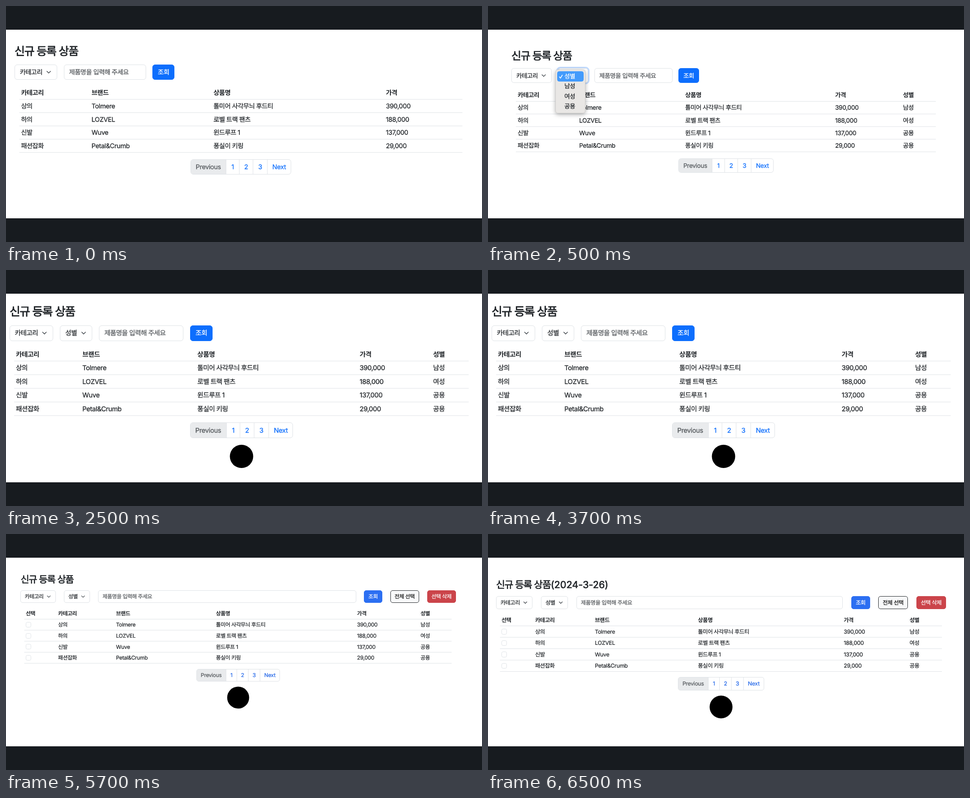
An HTML page for the animation above (8000 ms loop, 1060 by 528 pixels).

```html
<!DOCTYPE html>
<html lang="ko">
<head>
<meta charset="utf-8">
<title>신규 등록 상품</title>
<style>
  html, body { margin: 0; width: 100%; height: 100%; overflow: hidden; background: #171b1f; }
  #stage { position: relative; width: 1060px; height: 528px; overflow: hidden; }
  #strip { display: block; position: absolute; left: 0; top: 0; animation: scenes 8s step-end infinite; }
  @keyframes scenes {
    0% { transform: translateY(0); }
    6.25% { transform: translateY(-528px); }
    31.25% { transform: translateY(-1056px); }
    56.25% { transform: translateY(-1584px); }
    81.25%, 100% { transform: translateY(-2112px); }
  }
  text {
    font-family: Inter, "Noto Sans CJK KR", "Noto Sans CJK", "Noto Sans", sans-serif;
    letter-spacing: -.026em; white-space: pre; text-rendering: geometricPrecision;
    stroke-width: .02em; stroke-linejoin: round;
  }
  .ko { letter-spacing: -.045em; }
  .bold { font-weight: 700; stroke: none; }
  .title { letter-spacing: -.057em; stroke-width: .034em; }
  .title tspan { letter-spacing: 0; }
  .menu { filter: drop-shadow(0 3px 5px rgba(0, 0, 0, .3)); }
</style>
</head>
<body>
<div id="stage"><svg id="strip" width="1060" height="2640"></svg></div>
<script>
const INK = '#212529', LINE = '#dee2e6', HINT = '#54585c', WHITE = '#fff';
const HEADS = ['카테고리', '브랜드', '상품명', '가격', '성별'];
const ROWS = [
  ['상의', 'Tolmere', '톨미어 사각무늬 후드티', '390,000', '남성'],
  ['하의', 'LOZVEL', '로벨 트랙 팬츠', '188,000', '여성'],
  ['신발', 'Wuve', '윈드루프 1', '137,000', '공용'],
  ['패션잡화', 'Petal&Crumb', '퐁실이 키링', '29,000', '공용']
];
const PAGES = ['Previous', '1', '2', '3', 'Next'];
const TITLE = '신규 등록 상품';

// s: zoom of the page; x pairs are left and right edges; pager lists cell edges
const SCENES = [
  { s: .9, title: [19, 101], bar: 148, cat: [19, 114], input: [128.7, 312], find: [326.3, 375],
    table: [30, 1016, 208.9], cols: [33.4, 190.5, 462, 846], pager: [411, 490, 519.5, 550, 582, 634.5], py: 360 },
  { s: .855, title: [52, 111], bar: 155.7, cat: [52, 142], sex: [155.7, 223], open: true,
    input: [236.7, 410.7], find: [424, 470],
    table: [62.5, 997, 213.4], cols: [66, 203, 439, 773, 924], pager: [424, 499, 527, 556, 586, 636], py: 357 },
  { s: .925, title: [8, 93], bar: 141.1, cat: [7.5, 105], sex: [120, 192.3], input: [207, 395], find: [410, 460],
    table: [18.5, 1030, 203.7], cols: [22, 170, 426, 787.5, 951],
    pager: [409.5, 491, 521, 552.5, 585, 639], py: 358.8, mark: [524.5, 417, 26] },
  { s: .748, title: [32.5, 101], bar: 140, cat: [32, 111], sex: [129, 187.3], input: [205.3, 779.5],
    find: [797, 838], all: [855.8, 919.6], del: [937.5, 1001.7], soft: true,
    table: [41, 992, 190.5], cols: [116, 245, 467.5, 781.7, 923], check: 44,
    pager: [424, 490, 514, 539.5, 565.7, 609.5], py: 316, mark: [517, 366, 24.5] },
  { s: .773, title: [18, 113.5], date: '(2024-3-26)', bar: 153.5, cat: [17.7, 99.3], sex: [118, 178.3],
    input: [196.7, 790], find: [808.7, 851], all: [869, 935.2], del: [953.7, 1020], soft: true,
    table: [27, 1010.5, 205.6], cols: [105, 238, 467.5, 792.3, 938.7], check: 30,
    pager: [423, 490.7, 515.5, 542, 569, 614.5], py: 335, mark: [519, 387, 25.5] }
];

function add(parent, tag, attrs) {
  const el = document.createElementNS('http://www.w3.org/2000/svg', tag);
  for (const key in attrs) el.setAttribute(key, attrs[key]);
  return parent.appendChild(el);
}

// cy is the middle of the capital letters
function write(g, str, x, cy, size, fill = INK, style = '', anchor = 'start') {
  const script = /[가-힣]/.test(str) ? 'ko' : '';
  const el = add(g, 'text', { x, y: cy + size * .36, 'font-size': size, fill, stroke: fill,
    class: `${script} ${style}`, 'text-anchor': anchor });
  el.textContent = str;
  return el;
}

// edges sit on whole pixels
function box(g, span, cy, h, r, fill, stroke = fill) {
  const [left, right, top, bottom] = [...span, cy - h / 2, cy + h / 2].map(Math.round);
  return add(g, 'rect', { x: left + .5, y: top + .5, width: right - left - 1, height: bottom - top - 1,
    rx: r, fill, stroke });
}

function line(g, d, stroke, width) {
  return add(g, 'path', { d, fill: 'none', stroke, 'stroke-width': width,
    'stroke-linecap': 'round', 'stroke-linejoin': 'round' });
}

function drawBar(g, c) {
  const { s, bar } = c, size = 16 * s, h = 38 * s, r = 6 * s;
  const select = (span, label) => {
    box(g, span, bar, h, r, WHITE, LINE);
    write(g, label, span[0] + 13 * s, bar, size);
    const w = 4.5 * s;
    line(g, `M${span[1] - 21 * s - w} ${bar - w / 2}l${w} ${w}l${w} ${-w}`, '#343a40', 1.5 * s);
  };
  const button = (span, label, fill, color, stroke) => {
    box(g, span, bar, h, r, fill, stroke);
    write(g, label, (span[0] + span[1]) / 2, bar, size, color, '', 'middle');
  };
  select(c.cat, '카테고리');
  if (c.open) box(g, [c.sex[0] - 3.4, c.sex[1] + 3.4], bar, h + 6.8, r + 3, '#c2dbfe');
  if (c.sex) select(c.sex, '성별');
  box(g, c.input, bar, h, r, WHITE, LINE);
  write(g, '제품명을 입력해 주세요', c.input[0] + 13 * s, bar, size, HINT);
  button(c.find, '조회', c.soft ? '#2c6ff2' : '#0d6efd', WHITE);
  if (c.all) button(c.all, '전체 선택', '#f8f9fa', '#111', INK);
  if (c.del) button(c.del, '선택 삭제', '#cb444a', WHITE);
}

function drawTable(g, c) {
  const { s } = c, [left, right, top] = c.table, size = 16 * s, step = 33 * s;
  [HEADS, ...ROWS].forEach((row, i) => {
    const y = top + i * step, cy = y - step / 2, style = i ? '' : 'bold';
    c.cols.forEach((x, k) => write(g, row[k], x, cy, size, INK, style));
    if (c.check && i) box(g, [c.check, c.check + size], cy, size, 4 * s, WHITE, LINE);
    if (c.check && !i) write(g, '선택', c.check, cy, size, INK, style);
    line(g, `M${left} ${y}H${right}`, LINE, 1);
  });
}

function drawPager(g, c) {
  const { s, py, pager } = c, r = 6 * s, k = r - 1;
  const left = Math.round(pager[0]) + 1;
  const top = Math.round(py - 19 * s) + 1, bottom = Math.round(py + 19 * s) - 1;
  box(g, [pager[0], pager[5]], py, 38 * s, r, WHITE, LINE);
  add(g, 'path', { fill: '#e9ebed',
    d: `M${pager[1]} ${top}H${left + k}q${-k} 0 ${-k} ${k}V${bottom - k}q0 ${k} ${k} ${k}H${pager[1]}z` });
  PAGES.forEach((label, i) => {
    if (i) line(g, `M${pager[i]} ${top}V${bottom}`, LINE, 1);
    const color = i ? (c.soft ? '#2367e8' : '#0d6efd') : HINT;
    write(g, label, (pager[i] + pager[i + 1]) / 2, py, 16 * s, color, '', 'middle');
  });
}

function drawMenu(g, c) {
  box(g, [149.7, 217], 191, 98, 5, '#e9e7e5', '#cfcdcb').setAttribute('class', 'menu');
  box(g, [154, 212.5], 157.7, 22.6, 4, '#439bfc');
  line(g, 'M159 158.5l2.3 3l4.2-7', WHITE, 1.6);
  ['성별', '남성', '여성', '공용'].forEach((label, i) =>
    write(g, label, 170, 157.3 + i * 22.25, 16 * c.s, i ? INK : WHITE));
}

SCENES.forEach((c, i) => {
  const g = add(document.getElementById('strip'), 'g', { transform: `translate(0 ${i * 528})` });
  add(g, 'rect', { y: 53, width: 1060, height: 422, fill: WHITE });
  const title = write(g, TITLE, c.title[0], c.title[1], 28 * c.s, INK, 'title');
  if (c.date) add(title, 'tspan', {}).textContent = c.date;
  drawBar(g, c);
  drawTable(g, c);
  drawPager(g, c);
  if (c.mark) add(g, 'circle', { cx: c.mark[0], cy: c.mark[1], r: c.mark[2], fill: '#000' });
  if (c.open) drawMenu(g, c);
});
</script>
</body>
</html>
```
